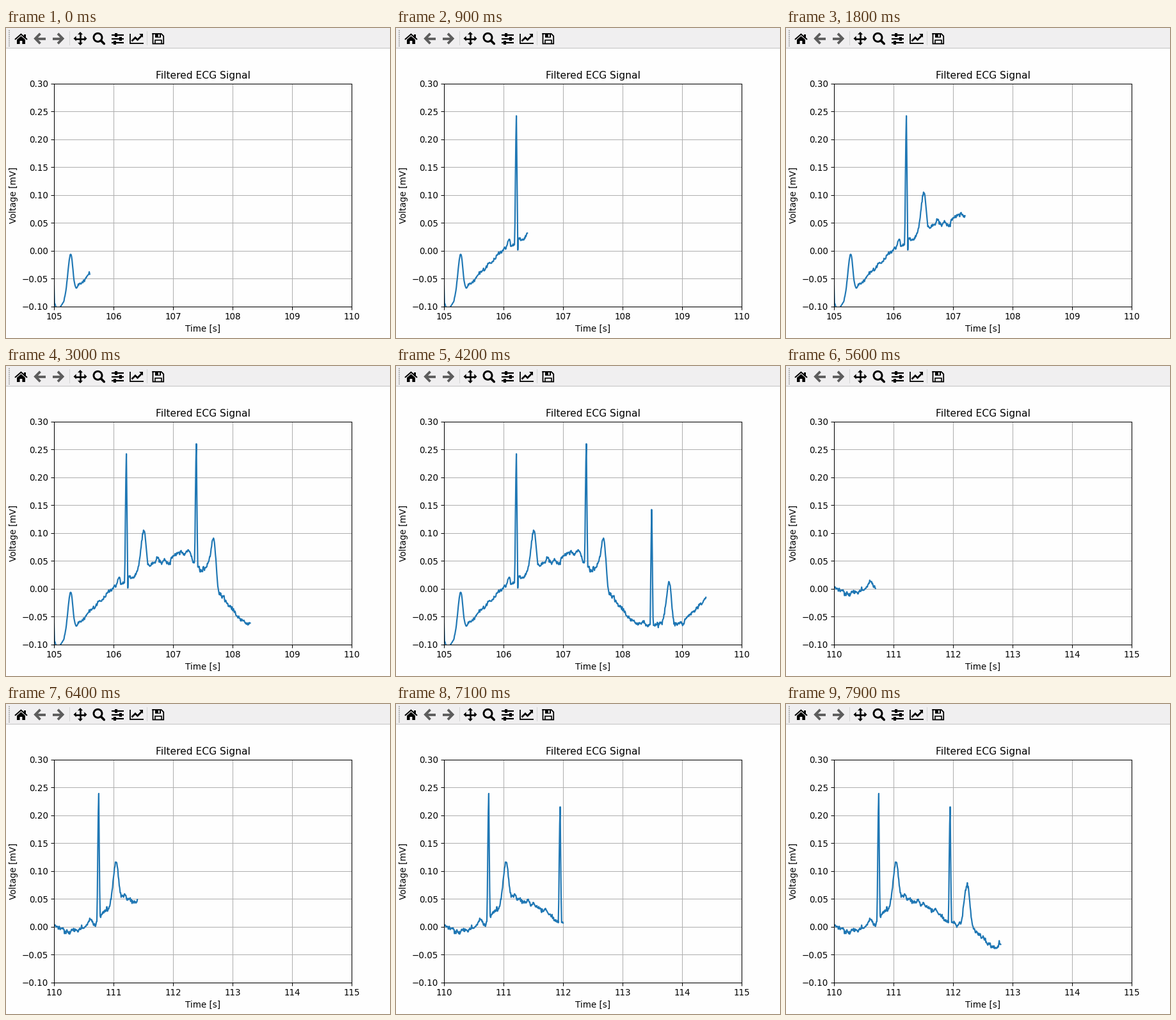
Write a matplotlib script that moves like this. It is 600 px wide and 484 px high and loops after 8000 ms.

```python
import numpy as np
import matplotlib.pyplot as plt
from matplotlib.animation import FuncAnimation
from matplotlib.patches import Circle, Polygon, Rectangle

W, H, BAR = 600, 484, 32
FRAMES, STEP_MS = 80, 100
PAPER, PANEL, GRAY = "#fefefe", "#f0eff0", "#5c5c5c"

plt.rcParams.update({
    "font.family": "DejaVu Sans",
    "font.size": 9.75,
    "axes.titlesize": 11.15,
    "axes.titlepad": 5.6,
    "axes.labelpad": 3.6,
    "axes.linewidth": 0.75,
    "grid.linewidth": 0.75,
    "lines.linewidth": 1.55,
    "xtick.major.size": 3.3, "ytick.major.size": 3.3,
    "xtick.major.pad": 3.3, "ytick.major.pad": 3.3,
    "xtick.major.width": 0.75, "ytick.major.width": 0.75,
})

# Turning points of the slow drift: (seconds, millivolts)
DRIFT = [
    (105, -.09), (105.05, -.108), (105.15, -.096), (105.37, -.068),
    (106, .002), (106.18, .011), (106.62, .04), (106.75, .055),
    (106.93, .047), (107.13, .066), (107.3, .056), (107.45, .034),
    (107.58, .035), (107.78, -.008), (108.1, -.052), (108.3, -.067),
    (109, -.062), (109.4, -.018), (110, .002), (110.22, -.009),
    (110.7, .004), (110.84, .025), (111.2, .06), (111.3, .047),
    (111.5, .042), (111.9, .006), (112.35, 0), (112.65, -.041),
    (112.8, -.032),
]
# Heartbeats: (seconds, top of the spike)
BEATS = [(104.985, 0), (106.215, .242), (107.39, .26), (108.49, .142),
         (109.6, .248), (110.75, .239), (111.95, .215)]


def bump(t, center, height, rise, fall):
    width = np.where(t < center, rise, fall)
    return height * np.exp(-0.5 * ((t - center) / width) ** 2)


def build_signal():
    rng = np.random.default_rng(11)
    t = np.arange(105, 112.9, 0.008)
    drift = np.interp(t, *zip(*DRIFT))
    wander = np.convolve(rng.normal(0, 0.006, t.size), np.ones(6) / 6, "same")
    v = drift + np.where(t < 105.4, 0.3, 1) * (
        wander + rng.normal(0, 0.0016, t.size))
    for beat, top in BEATS:
        v += bump(t, beat - 0.13, 0.01, 0.03, 0.03)
        v += bump(t, beat + 0.295, 0.073, 0.05, 0.035)
        # The spike replaces the samples around it
        base = np.interp(beat, *zip(*DRIFT))
        dip, end = base - 0.018, base - 0.012
        shape_t = beat + np.array([-.028, -.014, -.002, .002, .012, .025])
        shape_v = [dip, dip + .6 * (top - dip), top, top, (top + end) / 2, end]
        spike = (t > shape_t[0]) & (t < shape_t[-1])
        v[spike] = np.interp(t[spike], shape_t, shape_v)
    return t, v


fig = plt.figure(figsize=(W / 100, H / 100), dpi=100, facecolor=PAPER)
bar = fig.add_axes([0, 0, 1, 1])
bar.set(xlim=(0, W), ylim=(H, 0))
bar.axis("off")


def stroke(pts, width, color="black", cap="butt"):
    x, y = zip(*pts)
    bar.plot(x, y, color=color, lw=width * 0.72, solid_capstyle=cap,
             solid_joinstyle="miter")


def fill(*pts):
    bar.add_patch(Polygon(pts, closed=True, fc="black", lw=0))


def box(x, y, w, h, color="black"):
    bar.add_patch(Rectangle((x, y), w, h, fc=color, lw=0))


def draw_frame():
    box(0, 0, W, BAR - 1, PANEL)
    box(0, BAR - 1, W, 1, "#c2c2c2")
    for y in range(3, 29, 3):
        box(4, y, 1.5, 1.5, "#b4b4b4")
    for x in (99, 220):
        box(x, 5, 1, 22, "#d6d6d6")


def draw_home():
    stroke([(14, 18), (23.5, 9.7), (33, 18)], 2)
    box(28.2, 9.5, 2.6, 6)
    fill((17, 18.2), (23.5, 12.6), (30, 18.2), (30, 25), (25.4, 25),
         (25.4, 20), (21.6, 20), (21.6, 25), (17, 25))


def draw_arrow(tip, way):
    stroke([(tip + 2 * way, 16.5), (tip + 18 * way, 16.5)], 3.8, GRAY)
    stroke([(tip + 10 * way, 8.7), (tip + 2.4 * way, 16.5),
            (tip + 10 * way, 24.3)], 3.8, GRAY)


def draw_pan(cx, cy):
    for dx, dy in ((1, 0), (-1, 0), (0, 1), (0, -1)):
        stroke([(cx, cy), (cx + 8 * dx, cy + 8 * dy)], 2.6)
        fill((cx + 10.5 * dx, cy + 10.5 * dy),
             (cx + 6.3 * dx + 4 * dy, cy + 6.3 * dy + 4 * dx),
             (cx + 6.3 * dx - 4 * dy, cy + 6.3 * dy - 4 * dx))


def draw_zoom():
    bar.add_patch(Circle((143.5, 14.8), 6.5, fill=False, lw=2.1))
    stroke([(148.3, 19.6), (153.3, 24.6)], 3.6, cap="round")


def draw_sliders():
    for y, knob in ((11, 172), (17, 179), (23, 170)):
        stroke([(165, y), (184, y)], 2.2)
        box(knob - 3, y - 3, 6, 6, PANEL)
        box(knob - 2, y - 2.6, 4, 5.2)


def draw_chart():
    stroke([(194, 8.5), (194, 24), (215, 24)], 1.8)
    stroke([(196.5, 20.5), (202, 15), (205.5, 18.5), (212, 12)], 2.7)
    fill((208, 9), (214, 9), (214, 15))


def draw_disk():
    stroke([(229.5, 8), (229.5, 24.5), (246.2, 24.5), (246.2, 12.6),
            (242.6, 9), (228.6, 9)], 1.8)
    stroke([(233.2, 24.5), (233.2, 18.8), (242.5, 18.8), (242.5, 24.5)], 1.6)
    box(232.5, 9, 9, 6)
    box(237.5, 10, 2.2, 3.6, PANEL)


draw_frame()
draw_home()
draw_arrow(43.5, 1)
draw_arrow(91, -1)
draw_pan(116, 16.5)
draw_zoom()
draw_sliders()
draw_chart()
draw_disk()

ax = fig.add_axes([0.125, 49.3 / H, 0.775, 348 / H], facecolor=PAPER)
ax.set(title="Filtered ECG Signal", xlabel="Time [s]", ylabel="Voltage [mV]",
       ylim=(-0.1, 0.3), yticks=np.arange(-2, 7) * 0.05)
ax.grid(True, color="#b0b0b0")
trace, = ax.plot([], [], color="#1f77b4")

times, volts = build_signal()


def update(i):
    # Samples arrive in 0.1 s blocks, slightly slower than the frame rate
    now = 105.6 + 0.1 * int(0.91 * i + 0.35)
    page = 105 if now < 109.95 else 110
    ax.set(xlim=(page, page + 5), xticks=range(page, page + 6))
    shown = (times > page - 1e-6) & (times < now)
    trace.set_data(times[shown], volts[shown])
    return trace,


anim = FuncAnimation(fig, update, frames=FRAMES, interval=STEP_MS,
                     repeat=True, repeat_delay=0, blit=False)
plt.show()
```
